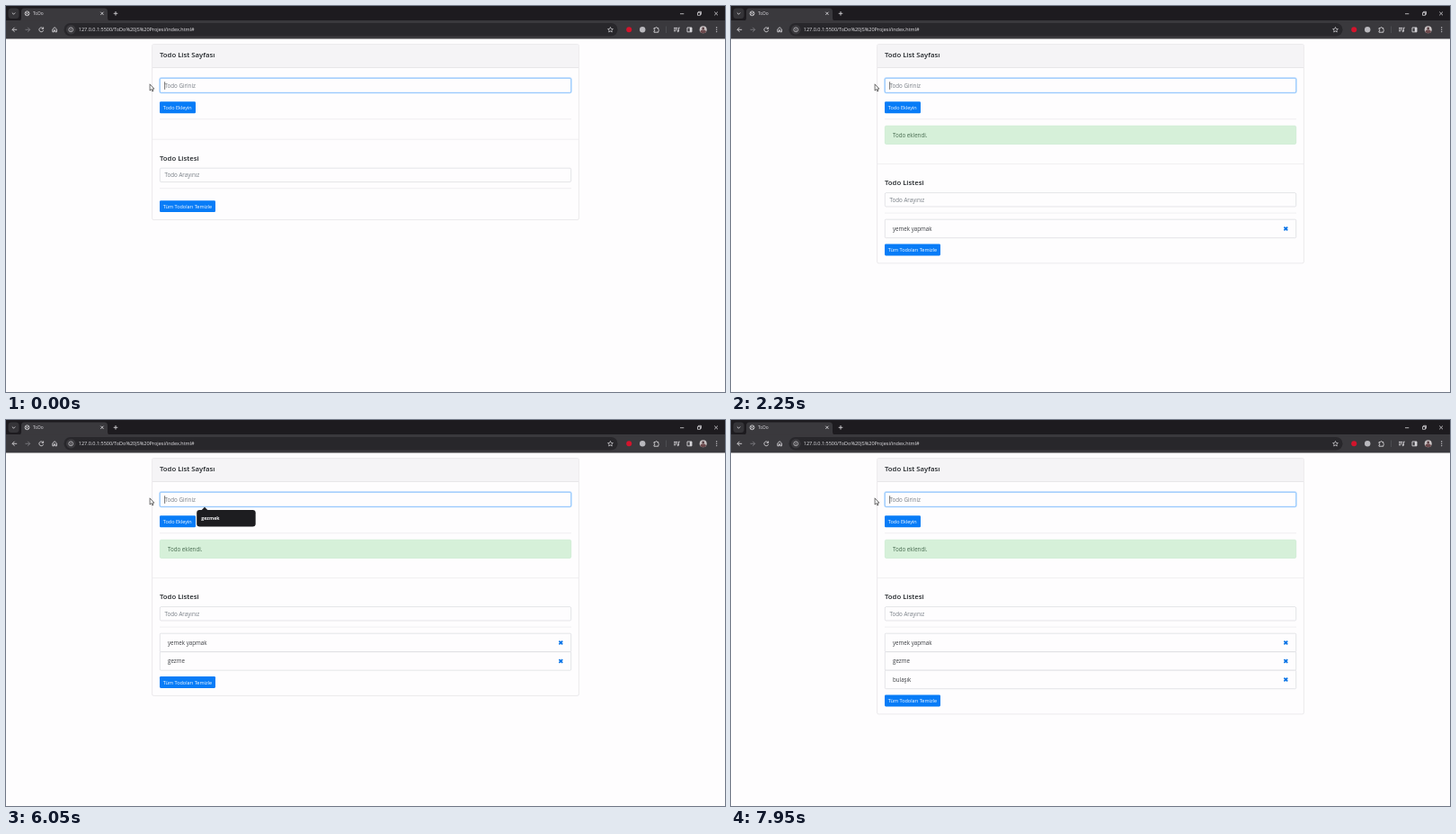
An HTML page for the animation above (8 s loop, 800 px wide and 429 px high).

```html
<!DOCTYPE html>
<html lang="tr">
<head>
<meta charset="utf-8">
<title>ToDo</title>
<style>
  html, body { margin: 0; width: 100%; height: 100%; overflow: hidden; background: #fefdfe; }
  svg { display: block; width: 100vw; height: 100vh; }
  text { font: 6.2px "Open Sans", "Noto Sans", sans-serif; fill: #3a3d41; white-space: pre; }
  .h { font-size: 7.75px; font-weight: 600; fill: #212529; }
  .hint { fill: #757c83; }
  .btn rect { fill: #087cf7; }
  .btn text { font-size: 5.5px; fill: #fff; }
  .line { stroke: #e6e5e7; stroke-width: .6; }
  .box { fill: #fefdfe; stroke: #d2d4d8; stroke-width: .6; }
  .icon { fill: none; stroke: #d6d5d9; stroke-width: .9; }
  .fill { fill: #d6d5d9; stroke: none; }
</style>
</head>
<body>
<svg viewBox="0 0 800 429" preserveAspectRatio="none">
  <!-- browser frame -->
  <rect width="800" height="17" fill="#1d1b1f"/>
  <rect y="16" width="800" height="20.5" fill="#3a393d"/>
  <rect x="2.5" y="2.5" width="12" height="11.5" rx="3.5" fill="#353438"/>
  <path d="M14 16.5Q17 16.5 17 13V6Q17 2.5 20.5 2.5H109.500Q113 2.500 113 6V13Q113 16.500 116 16.500Z" fill="#3a393d"/>
  <rect x="64.500" y="19" width="616" height="14.500" rx="7.250" fill="#28272b"/>
  <circle cx="72.200" cy="26.300" r="5.300" fill="#3a393d"/>
  <text x="30" y="10.300" style="font-size:4.800px;fill:#dcdbe0">ToDo</text>
  <text x="80.800" y="28.300" style="font-size:5.500px;fill:#e4e3e7">127.0.0.1:5500/ToDo%20JS%20Projesi/index.html#</text>
  <g class="icon">
    <path d="M6.800 7.500l1.700 1.700 1.700-1.700"/>
    <circle cx="23.500" cy="8.300" r="2.400"/>
    <path d="M21.700 9.800l1.800-1.500 1.700-1.600M22 7l3 2.800" stroke-width=".7"/>
    <path d="M105.300 6.700l3.200 3.200m0-3.200l-3.200 3.200M119.700 8.300h4.600M122 6v4.600"/>
    <path d="M750 8.700h4.300M769.500 7.300h3v3h-3zM770.500 7.300V6.300h3v3h-1M788.200 6.500l3.800 3.800m0-3.800l-3.800 3.800" stroke-width=".8"/>
    <path d="M12.200 26.300H7.200M9.500 23.800l-2.500 2.500 2.500 2.500"/>
    <path d="M21.500 26.300h5M24.200 23.800l2.500 2.500-2.500 2.500" stroke="#7c7b80"/>
    <path d="M41.200 24.900A2.400 2.400 0 1 0 41.600 26.900M41.600 23.500v1.900h-1.900"/>
    <path d="M51.800 25.800v3h1.600v-2h1.400v2h1.600v-3L54.100 23.700z"/>
    <circle cx="72.200" cy="26.300" r="2.400" stroke-width=".7"/>
    <path d="M72.200 26v1.500M72.200 24.800v.6" stroke-width=".7"/>
    <path d="M672.500 23.500l.85 1.900 2.050.2-1.550 1.350.45 2.050-1.800-1.050-1.800 1.050.45-2.050-1.550-1.350 2.050-.2z" stroke-width=".7"/>
    <path d="M721 24.500h1.700a.9.9 0 0 1 1.800 0h1.300v1.700a.9.9 0 0 1 0 1.700v1.300h-4.800v-1.500a.8.8 0 0 0 0-1.700z"/>
    <path d="M734.500 22.500v7.500" stroke="#5c5b60" stroke-width=".6"/>
    <path d="M743 24.400h4.300M743 26.100h4.300M743 27.800h2.300M748.400 28V24.200h1.300"/>
    <circle cx="747.700" cy="28" r=".7"/>
    <path d="M758 24h5v4.800h-5z"/>
    <path class="fill" d="M760.700 24h2.300v4.800h-2.300z"/>
    <circle class="fill" cx="790.700" cy="24" r=".65"/>
    <circle class="fill" cx="790.700" cy="26.300" r=".65"/>
    <circle class="fill" cx="790.700" cy="28.600" r=".65"/>
  </g>
  <circle cx="693.200" cy="26.300" r="3" fill="#d3142c"/>
  <circle cx="708.200" cy="26.300" r="3.200" fill="#b9b8bd"/>
  <circle cx="775.700" cy="26.300" r="4" fill="#c9c3c4"/>
  <path d="M772.300 28.400a3.500 2.900 0 0 1 6.800 0a4 4 0 0 1-6.800 0z" fill="#6d4a4d"/>
  <circle cx="775.700" cy="24.900" r="1.400" fill="#5a4145"/>

  <!-- card -->
  <rect id="card" x="162.600" y="42.600" width="474.800" height="195" rx="1.700" fill="none" stroke="#dddcdf" stroke-width=".6"/>
  <path d="M163 68.500V44.300Q163 43 164.300 43H635.700Q637 43 637 44.300V68.500Z" fill="#f5f4f6"/>
  <path class="line" d="M163 68.500H637" style="stroke:#dddcdf"/>
  <text class="h" x="171" y="56.600">Todo List Sayfası</text>
  <rect x="170.300" y="79.300" width="459.400" height="18" rx="2.200" fill="#bfdeff"/>
  <rect x="171.300" y="80.300" width="457.400" height="16" rx="1.500" fill="#fefdfe" stroke="#72b5fb" stroke-width=".7"/>
  <text id="field" x="176.600" y="90.700"></text>
  <rect id="caret" y="84.200" width=".7" height="8.600" fill="#333"/>
  <g class="btn">
    <rect x="171" y="106.300" width="40" height="12.900" rx="1.300"/>
    <text x="174.800" y="115">Todo Ekleyin</text>
  </g>
  <path class="line" d="M171 125.700H629"/>
  <g id="alert">
    <rect x="171.300" y="133.200" width="457.400" height="20.300" rx="1.500" fill="#d6f0d9" stroke="#c5e7cb" stroke-width=".6"/>
    <text x="180" y="145.700" style="fill:#45694d">Todo eklendi.</text>
  </g>

  <g id="lower">
    <path class="line" d="M163 148.200H637"/>
    <text class="h" x="171" y="171.600">Todo Listesi</text>
    <rect class="box" x="171.300" y="180.200" width="457.400" height="15.400" rx="1.500"/>
    <text class="hint" x="176.600" y="190.400">Todo Arayınız</text>
    <path class="line" d="M171 202.700H629"/>
    <g id="list"></g>
    <g class="btn" id="clear">
      <rect x="171" y="216.200" width="62" height="12.900" rx="1.300"/>
      <text x="174.800" y="224.900">Tüm Todoları Temizle</text>
    </g>
  </g>

  <g id="popup">
    <path d="M217.500 100.300L221 96.800L224.500 100.300Z" fill="#1d1d20"/>
    <rect x="212.200" y="99.900" width="65.500" height="18.600" rx="3.300" fill="#1d1d20"/>
    <text x="217.300" y="111.200" style="font-size:5.300px;font-weight:700;fill:#f4f4f5">gezmek</text>
  </g>
  <path d="M160.100 86.800V94l1.600-1.400 1.100 2.300 1.100-.5-1.100-2.300h2.100z" fill="#fff" stroke="#333" stroke-width=".7"/>
</svg>
<script>
const LOOP = 8000, BLINK = 530, ALERT = 2000, ROW = 20.5, SHIFT = 27.4;

// Each entry: its text, the time of every key press, and of Enter.
const todos = [
  { text: "yemek yapmak", keys: [650, 750, 850, 1000, 1050, 1150, 1250, 1350, 1450, 1650, 1850, 1960], enter: 2150 },
  { text: "gezme", keys: [3400, 3550, 3650, 3800, 3920], enter: 4240 },
  { text: "bulaşık", keys: [6630, 6750, 6950, 7100, 7300, 7500, 7700], enter: 7950 }
];
const strokes = [-430, ...todos.flatMap(d => d.keys)];

const $ = id => document.getElementById(id);
const [field, caret, card, alertBox, lower, list, clear, popup] =
  ["field", "caret", "card", "alert", "lower", "list", "clear", "popup"].map($);
const show = (el, on) => { el.style.display = on ? "" : "none"; };
const moveY = (el, y) => el.setAttribute("transform", `translate(0 ${y})`);

list.innerHTML = todos.map((d, i) => {
  const y = 209.8 + i * ROW;
  return `<g><rect class="box" x="171.300" y="${y}" width="457.400" height="${ROW}" rx="1"/>
    <text x="180" y="${y + 12.4}">${d.text}</text>
    <path d="M615.400 ${y + 8.4}l3.800 3.800m0-3.800l-3.800 3.800" stroke="#0873e6" stroke-width="1.700"/></g>`;
}).join("");
const rows = [...list.children];

function draw(t) {
  const done = todos.filter(d => t >= d.enter).length;
  const now = todos[done];
  const typed = now ? now.text.slice(0, now.keys.filter(k => t >= k).length) : "";
  field.textContent = typed || "Todo Giriniz";
  field.setAttribute("class", typed ? "" : "hint");

  const last = strokes.filter(k => t >= k).pop();
  show(caret, Math.floor((t - last) / BLINK) % 2 === 0);
  caret.setAttribute("x", 176.4 + (typed ? field.getComputedTextLength() + .1 : 0));

  const alerting = todos.some(d => t >= d.enter && t < d.enter + ALERT);
  const shift = alerting ? SHIFT : 0;
  const grow = done ? done * ROW + .4 : 0;
  show(alertBox, alerting);
  moveY(lower, shift);
  moveY(clear, grow);
  card.setAttribute("height", 195 + shift + grow);
  rows.forEach((r, i) => show(r, i < done));

  // The suggestion fades to a faint trace before it goes.
  show(popup, t >= 3550 && t < 6950);
  popup.style.opacity = t < 6600 ? 1 : Math.max(.035, 1 - (t - 6600) / 100);
}

function tick() {
  draw(performance.now() % LOOP);
  requestAnimationFrame(tick);
}
tick();
</script>
</body>
</html>
```
